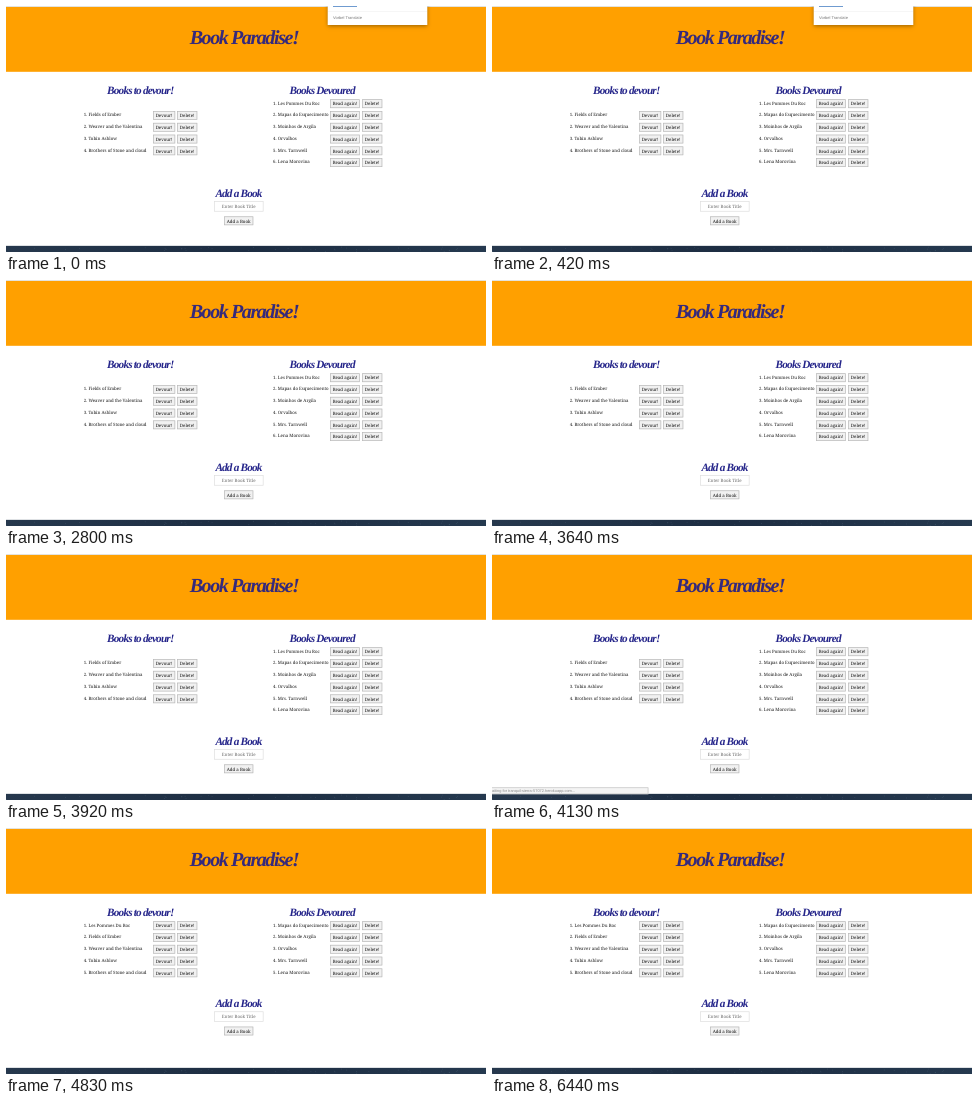
Animation of 480 by 246 pixels, one loop 6.51 s. Source, as an HTML page with a canvas:

```html
<!DOCTYPE html>
<html lang="en">
<head>
<meta charset="utf-8">
<title>Book Paradise!</title>
<style>
  html, body { margin: 0; width: 100%; height: 100%; overflow: hidden; background: #fff; }
  canvas { display: block; width: 480px; height: 246px; }
</style>
</head>
<body>
<canvas id="stage" width="480" height="246"></canvas>
<script>
const ctx = document.getElementById('stage').getContext('2d');
const LOOP = 6510;
const POPUP_END = 2800, STATUS_IN = 4060, MOVE = 4270, STATUS_OUT = 4620, STEP = 70;
const ROW = 11.78, FIRST = 97;
const SERIF = '"Noto Serif", serif';
const SANS = '"Liberation Sans", Arial, sans-serif';
const SCRIPT = '"Liberation Serif", "Times New Roman", serif';

const toRead = ['Fields of Ember', 'Weaver and the Valentina', 'Tobin Ashlow', 'Brothers of Stone and cloud'];
const done = ['Les Pommes Du Roc', 'Mapas do Esquecimento', 'Moinhos de Argila', 'Orvalhos', 'Mrs. Tarnwell', 'Lena Morovina'];

function text(str, x, y, font, color, align = 'left', spacing = 0) {
  ctx.font = font;
  ctx.letterSpacing = spacing + 'px';
  ctx.textRendering = 'geometricPrecision';
  ctx.textAlign = align;
  ctx.textBaseline = 'alphabetic';
  ctx.fillStyle = color;
  ctx.fillText(str, x, y);
}

function heading(str, x, y, size, color = '#25258a') {
  text(str, x, y, `italic bold ${size}px ${SCRIPT}`, color, 'center', -0.07 * size);
}

function rect(x, y, w, h, fill) {
  ctx.fillStyle = fill;
  ctx.fillRect(x, y, w, h);
}

function box(x, y, w, h, fill, line) {
  rect(x, y, w, h, fill);
  ctx.strokeStyle = line;
  ctx.lineWidth = 0.7;
  ctx.strokeRect(x + 0.35, y + 0.35, w - 0.7, h - 0.7);
}

function button(label, x, cy, w) {
  box(x, cy - 4.4, w, 8.8, '#f1f1f1', '#b9b9b9');
  text(label, x + w / 2, cy + 1.7, `500 4.4px ${SERIF}`, '#111', 'center');
}

function list(items, x, top, action, bx, bw, dx) {
  items.forEach((title, i) => {
    const y = top + i * ROW;
    const font = `500 4.4px ${SERIF}`;
    text(i + 1 + '.', x - 1.2, y + 1.5, font, '#1a1a1a', 'right');
    text(title, x, y + 1.5, font, '#1a1a1a');
    button(action, bx, y + 0.7, bw);
    button('Delete!', dx, y + 0.7, 20.3);
  });
}

function form(y) {
  heading('Add a Book', 232.5, y, 11.2);
  box(208, y + 4.2, 49.5, 10.4, '#fff', '#dedede');
  text('Enter Book Title', 232.7, y + 11.1, `4.4px ${SERIF}`, '#6c6c6c', 'center');
  button('Add a Book', 218, y + 23.8, 29.3);
}

function wallpaper() {
  const g = ctx.createLinearGradient(0, 0, 480, 0);
  g.addColorStop(0, '#26384d');
  g.addColorStop(0.5, '#1d2d42');
  g.addColorStop(1, '#25394f');
  rect(0, 240, 480, 6, g);
  let seed = 7;
  const rnd = () => (seed = seed * 16807 % 2147483647) / 2147483647;
  for (let i = 0; i < 40; i++) {
    rect(rnd() * 480, 240.5 + rnd() * 5, 0.8, 0.6, 'rgba(150,175,195,0.25)');
  }
  rect(0, 239.4, 480, 0.6, '#c9ced3');
}

function popup() {
  ctx.save();
  ctx.shadowColor = 'rgba(0,0,0,0.4)';
  ctx.shadowBlur = 4;
  ctx.shadowOffsetY = 1;
  rect(321.7, -4, 99.6, 23, '#fff');
  ctx.restore();
  rect(327, 0, 24, 1, '#6f9bd0');
  rect(322, 5.2, 99, 0.5, '#ececec');
  text('Vorbel Translate', 327, 13.4, `4px ${SANS}`, '#777');
}

function status(alpha) {
  ctx.save();
  ctx.globalAlpha = alpha;
  box(-1, 233.4, 157.4, 6.8, '#f4f4f4', '#c4c4c4');
  text('aiting for tranquil-sierra-57072.herokuapp.com...', 0, 238.1, `3.9px ${SANS}`, '#8a8a8a');
  ctx.restore();
}

function draw(t) {
  const moved = t >= MOVE;
  rect(0, 0, 480, 246, '#fff');
  rect(0, 0, 480, 1, '#e3e3de');
  rect(0, 1, 480, 64.8, '#ffa000');
  heading('Book Paradise!', 238, 38.3, 20, '#35297c');
  heading('Books to devour!', 134.3, 88.3, 11.2);
  heading('Books Devoured', 316.2, 88.3, 11.2);

  const left = moved ? [done[0], ...toRead] : toRead;
  const right = moved ? done.slice(1) : done;
  list(left, 82.4, moved ? FIRST : FIRST + ROW, 'Devour!', 147, 22.2, 171);
  list(right, 271.8, FIRST, 'Read again!', 324, 29.8, 356);
  form(moved ? 179.2 : 191);
  wallpaper();

  if (t < POPUP_END) popup();
  if (t >= STATUS_IN && t < STATUS_OUT + STEP) {
    status(t < STATUS_IN + STEP || t >= STATUS_OUT ? 0.5 : 1);
  }
}

const start = performance.now();
function tick() {
  draw((performance.now() - start) % LOOP);
  requestAnimationFrame(tick);
}
tick();
</script>
</body>
</html>
```
